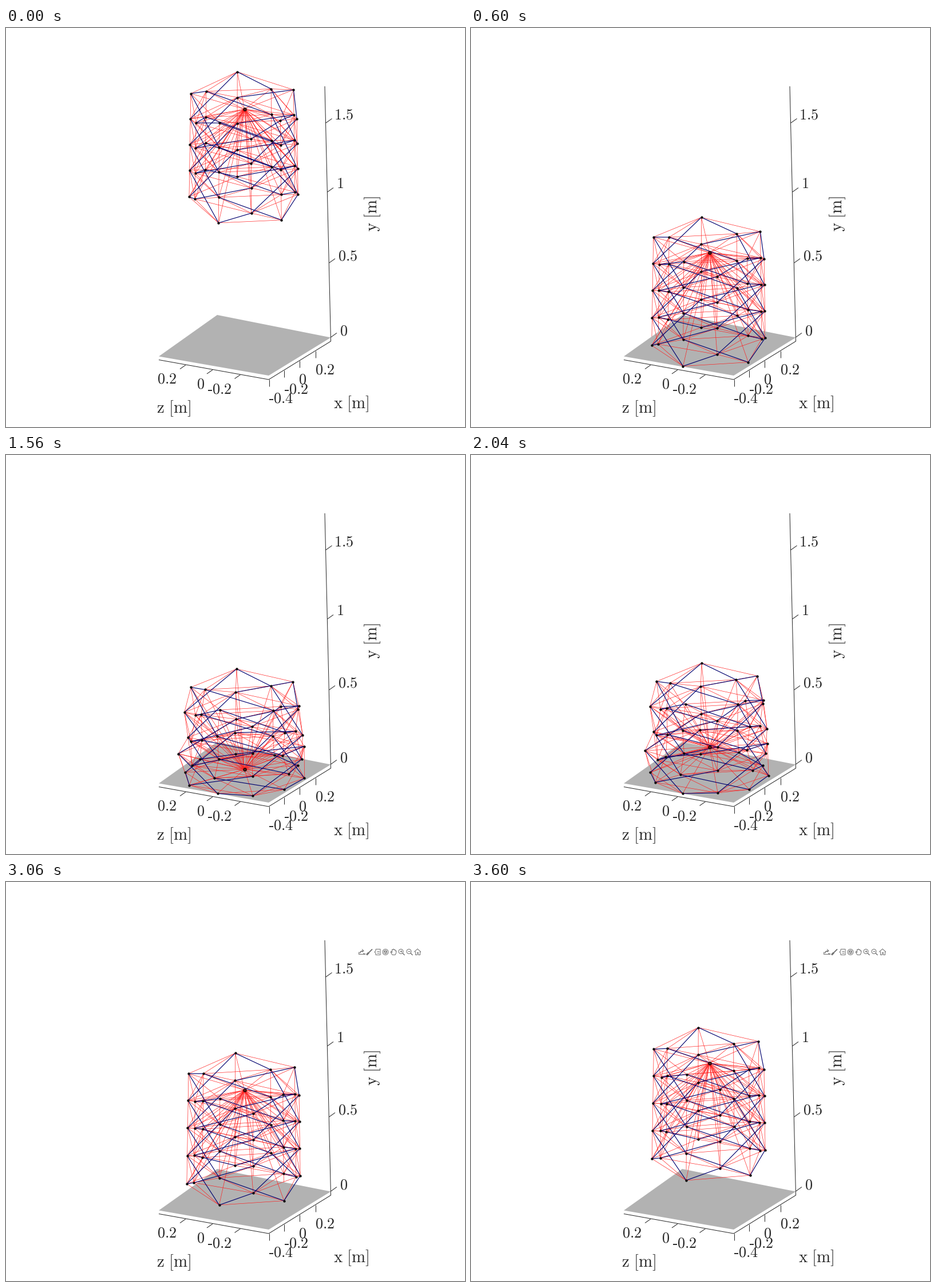
A matplotlib script that plays this animation: 802x698 px, repeating every 3660 ms.

```python
import numpy as np
import matplotlib.pyplot as plt
from matplotlib.animation import FuncAnimation
from matplotlib.collections import LineCollection
from matplotlib.patches import Polygon

W, H, DPI = 802, 698, 100
FRAMES, INTERVAL = 61, 60
PX = 72 / DPI
RINGS = 9
INK = "#262626"
ICON = "#707070"

plt.rcParams["mathtext.fontset"] = "cm"

# ---------- camera ----------
RIGHT = np.array([0.469, -0.883])
NEAR = np.array([0.885, 0.465])


def project(x, y, z):
    w = 1 - 0.076 * x - 0.069 * z + 0.0409 * y
    sx = (416.6 + 99.6 * x - 272.1 * z + 17.1 * y) / w
    sy = (560.5 - 129.6 * x - 83.1 * z - 242.5 * y) / w
    return np.stack([sx, sy], axis=-1)


# ---------- motion ----------
def even(top, bottom):
    return np.linspace(top, bottom, RINGS)


ROUND = np.full(RINGS, 0.365)
SQUASHED = [.355, .356, .383, .384, .369, .378, .410, .391, .373]

TOUCH = 10
KEY_T = np.array([0, TOUCH, 18, 23, 34, 42, 51, 60])
HEIGHT = np.array([
    even(1.753, 1.0035),
    even(0.7246, 0),
    [.562, .464, .391, .290, .230, .130, .115, 0, 0],
    [.562, .462, .390, .288, .225, .125, .115, 0, 0],
    [.608, .510, .436, .336, .267, .167, .140, .02, 0],
    [.701, .610, .520, .430, .334, .248, .166, .07, 0],
    even(0.849, 0.1035),
    even(1.027, 0.2745),
])
RADIUS = np.array([
    ROUND,
    ROUND,
    SQUASHED,
    [.350, .355, .385, .384, .363, .376, .418, .392, .373],
    [.343, .355, .382, .380, .356, .370, .408, .385, .373],
    [.358, .360, .371, .368, .366, .368, .382, .375, .373],
    ROUND,
    ROUND,
])
HUB = np.array([1.685, .648, .074, .030, .188, .486, .763, .953])
PHASE = np.array([-8, -8.6, -8.6, -8.7, -8.8, -8.8, -9.8, -11.8])


def ease(keys, t):
    """Straight in free flight, smooth cubic after touchdown."""
    i = min(np.searchsorted(KEY_T, t, side="right") - 1, len(KEY_T) - 2)
    span = KEY_T[i + 1] - KEY_T[i]
    s = (t - KEY_T[i]) / span
    a, b = keys[i], keys[i + 1]
    if t < TOUCH:
        return a + (b - a) * s
    slope = np.gradient(keys, KEY_T, axis=0)
    return ((2 * s**3 - 3 * s**2 + 1) * a + (3 * s**2 - 2 * s**3) * b
            + span * ((s**3 - 2 * s**2 + s) * slope[i]
                      + (s**3 - s**2) * slope[i + 1]))


def pose(t):
    """Screen points of all ring nodes, the hub last."""
    height = np.maximum(ease(HEIGHT, t), 0)
    radius = ease(RADIUS, t)
    ring = np.arange(RINGS)[:, None]
    step = 2 * np.arange(5)[None, :] + ring % 2
    angle = np.radians(ease(PHASE, t) + 36 * step)
    side, depth = np.sin(angle), np.cos(angle)
    x = radius[:, None] * (side * RIGHT[0] + depth * NEAR[0])
    z = radius[:, None] * (side * RIGHT[1] + depth * NEAR[1])
    y = np.broadcast_to(height[:, None], x.shape)
    nodes = project(x, y, z).reshape(-1, 2)
    return np.vstack([nodes, project(0.0, ease(HUB, t), 0.0)])


# ---------- structure ----------
def node(ring, step):
    return ring * 5 + step % 10 // 2


def steps(ring):
    return range(ring % 2, 10, 2)


def build():
    struts, cables, low = [], [], []
    for r in range(RINGS):
        for k in steps(r):
            a = node(r, k)
            cables.append((a, node(r, k + 2)))
            cables.append((a, RINGS * 5))
            if r + 2 < RINGS:
                turn = 2 if r % 2 else -2
                struts.append((a, node(r + 2, k + turn)))
                group = low if r >= RINGS - 4 else cables
                group.append((a, node(r + 2, k)))
            if r + 1 < RINGS:
                for turn in (-1, 1):
                    rigid = turn == 1 and r in (0, RINGS - 2)
                    group = struts if rigid else cables
                    group.append((a, node(r + 1, k + turn)))
    return np.array(struts), np.array(cables), np.array(low)


STRUTS, CABLES, LOW = build()

# ---------- stage ----------
fig = plt.figure(figsize=((W + 0.01) / DPI, (H + 0.01) / DPI), dpi=DPI,
                 facecolor="white")
ax = fig.add_axes([0, 0, 1, 1])
ax.set_xlim(0, W)
ax.set_ylim(H, 0)
ax.axis("off")


def line(points, width=1.0, color=INK, z=2):
    xs, ys = zip(*points)
    return ax.plot(xs, ys, color=color, lw=width * PX, zorder=z,
                   solid_capstyle="butt")[0]


def label(x, y, text, size=26.3, negative=False, **kw):
    ax.text(x, y, r"$\mathrm{%s}$" % text, fontsize=size * PX, color=INK,
            ha="center", va="center", zorder=2, **kw)
    if negative:
        line([(x - 24.5, y + 2.5), (x - 17.5, y + 2.5)], 1.9)


ax.add_patch(Polygon([(369, 502), (567.5, 541.5), (459, 608), (267, 574.5)],
                     fc="#b2b2b2", ec="none", zorder=1))
line([(267, 580.5), (459, 615), (567.5, 548), (557, 102)])

for x, y in [(314, 589.5), (361, 598), (409.5, 606.5)]:
    line([(x, y), (x - 10, y + 7)])
for x, y in [(459.5, 615), (486, 599), (513, 582), (540.5, 565)]:
    line([(x, y), (x, y + 12)])
for x, y in [(559, 166), (561.5, 287), (564.5, 411), (567.5, 541)]:
    line([(x, y), (x + 10.5, y - 7.5)])

label(590.5, 152, "1.5")
label(584, 272.5, "1")
label(597.5, 399, "0.5")
label(590.5, 530, "0")
label(281.5, 614.5, "0.2")
label(340, 623.5, "0")
label(377.5, 632, "0.2", negative=True)
label(557, 598.5, "0.2")
label(518.5, 615, "0")
label(511, 632, "0.2", negative=True)
label(484.5, 648, "0.4", negative=True)
label(603, 658, r"x\ [m]", 29)
label(293, 666, r"z\ [m]", 29)
label(641, 325, r"y\ [m]", 29, rotation=90)


# ---------- toolbar ----------
def circle(x, y, r):
    a = np.linspace(0, 2 * np.pi, 25)
    return list(zip(x + r * np.cos(a), y + r * np.sin(a)))


def toolbar():
    y = 122.5
    parts = []

    def stroke(*points, width=1.0):
        parts.append(line(points, width, ICON, 6))

    def at(x, *offsets, width=1.0):
        stroke(*[(x + dx, y + dy) for dx, dy in offsets], width=width)

    # export, brush
    at(621, (-5, 0), (-5, 4), (3, 4), (3, 2))
    at(621, (-3, 2), (-1, -1), (3, -2), width=1.6)
    at(621, (1, -5), (4, -2), (1, 0))
    at(626, (-1, 4), (2, 4), width=1.8)
    at(635, (5, -5), (-1, 1), width=1.8)
    at(635, (-1, 1), (-5, 5), width=3)
    # data tip, rotate
    at(649, (-3, -5), (5, -5), (5, 5), (-3, 5), (-3, 2), (-5, 0), (-3, -2),
       (-3, -5))
    at(649, (-1, -1.5), (3, -1.5))
    at(649, (-1, 1.5), (3, 1.5))
    stroke(*circle(663, y, 5))
    at(663, (-2.5, -1.5), (0, -3), (2.5, -1.5), (2.5, 1.5), (0, 3),
       (-2.5, 1.5), (-2.5, -1.5), (0, 0), (2.5, -1.5))
    at(663, (0, 0), (0, 3))
    # pan
    at(677, (-2, 5), (-5, 0), (-4, -1), (-2.5, 1), (-2.5, -4), (-1, -4),
       (-1, -5), (1, -5), (1, -4), (3, -4), (3, -2), (5, -2), (4.5, 2),
       (3, 5), (-2, 5))
    # zoom in, zoom out
    for x in (691, 705):
        stroke(*circle(x - 1, y - 1, 4))
        at(x, (2, 2), (5.5, 5.5), width=1.4)
        at(x, (-3, -1), (1, -1))
    at(691, (-1, -3), (-1, 1))
    # home
    at(719, (-6, 0), (0, -5.5), (6, 0))
    at(719, (-4, -1), (-4, 5), (-1, 5), (-1, 1), (1, 1), (1, 5), (4, 5),
       (4, -1))
    return parts


icons = toolbar()
TOOLBAR_FROM = 48

# ---------- moving parts ----------


def bundle(color, width, z):
    group = LineCollection([], colors=color, linewidths=width * PX, zorder=z)
    ax.add_collection(group)
    return group


layers = [
    (bundle("#ff1c1c", 0.65, 0.5), LOW),
    (bundle("#ff1c1c", 0.65, 3), CABLES),
    (bundle("#00006e", 1.15, 4), STRUTS),
]
dots, = ax.plot([], [], "o", ms=4.4 * PX, color="#0c0c0c", mew=0, zorder=5)
hub, = ax.plot([], [], "o", ms=5.2 * PX, mfc="#5a1a1a", mec="black",
               mew=1.2 * PX, zorder=5)


def draw(i):
    points = pose(i)
    for group, pairs in layers:
        group.set_segments(points[pairs])
    dots.set_data(points[:-1, 0], points[:-1, 1])
    hub.set_data(points[-1:, 0], points[-1:, 1])
    for part in icons:
        part.set_visible(i >= TOOLBAR_FROM)
    return [group for group, _ in layers] + [dots, hub] + icons


anim = FuncAnimation(fig, draw, frames=FRAMES, interval=INTERVAL,
                     repeat=True, repeat_delay=0, blit=False)
plt.show()
```
